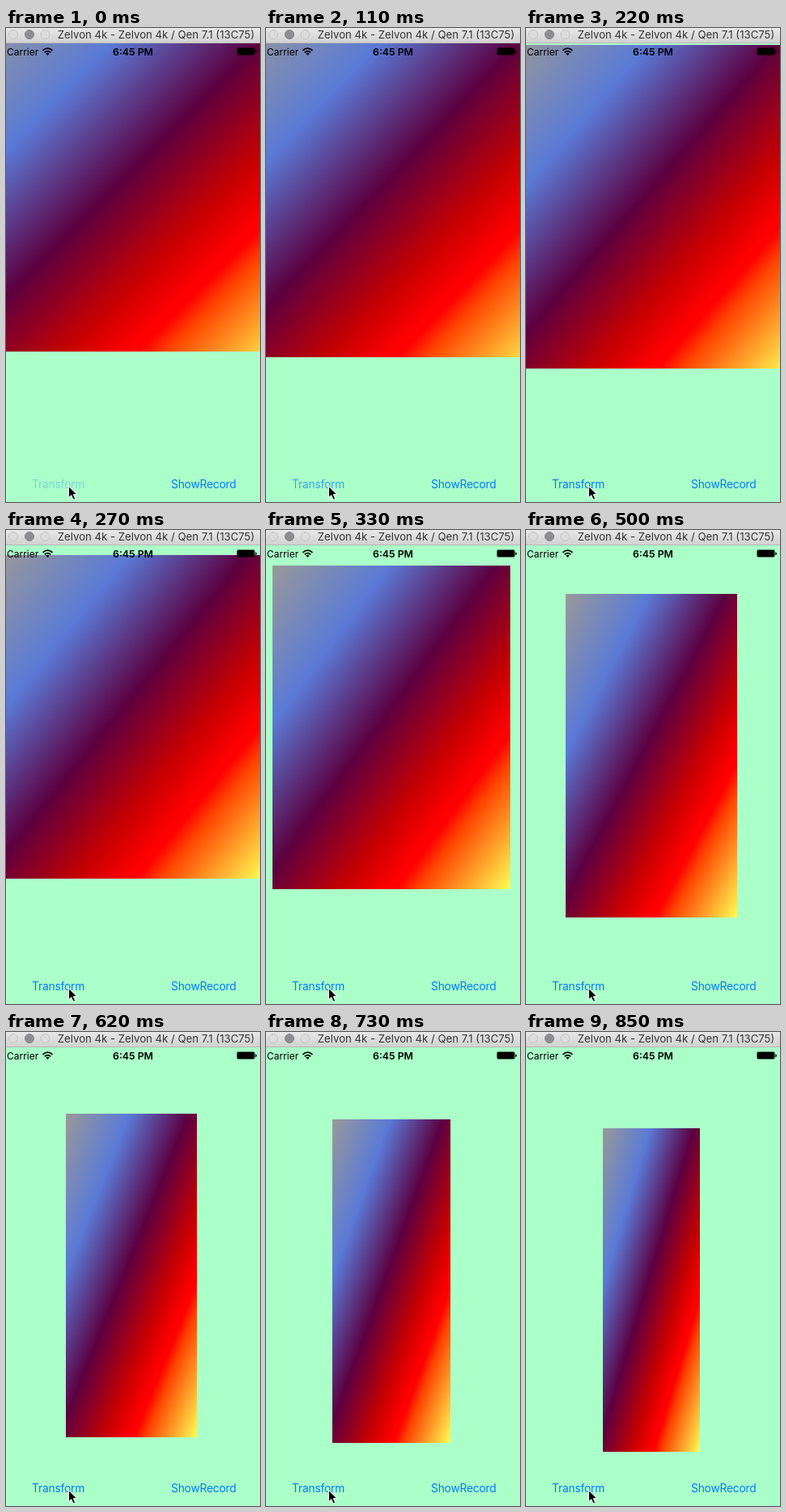
An HTML page for the animation above (1000 ms loop, 314 by 586 pixels).

```html
<!DOCTYPE html>
<html lang="en">
<head>
<meta charset="utf-8">
<style>
  html, body { margin: 0; width: 100%; height: 100%; overflow: hidden; }
  body { position: relative; background: #abffc8; }
  #panel {
    position: absolute;
    height: 400px;
    background: linear-gradient(to bottom right,
      #999 0%, #5a7ad6 24.5%, #5c0040 47%, #c80000 65%, #f00 74.5%,
      #f00 76%, #ff4400 80.5%, #ffff55 100%);
  }
  svg { position: absolute; left: 0; top: 0; }
  text { font-family: Inter, Roboto, sans-serif; }
  .button { font-size: 13.8px; letter-spacing: -.2px; fill: #007aff; }
</style>
</head>
<body>
<div id="panel"></div>
<svg width="314" height="586" viewBox="0 0 314 586">
  <defs>
    <linearGradient id="chrome" x2="0" y2="1">
      <stop stop-color="#e8e8e8"/>
      <stop offset="1" stop-color="#d0d0d0"/>
    </linearGradient>
  </defs>

  <!-- window title bar -->
  <rect width="314" height="19" fill="url(#chrome)"/>
  <rect y="18" width="314" height="1" fill="#b8b8b8"/>
  <g fill="#dcdcdc" stroke="#c4c4c4">
    <circle cx="9" cy="8" r="5.5"/>
    <circle cx="29" cy="8" r="5.5" fill="#8e8e92" stroke="#848488"/>
    <circle cx="48.5" cy="8" r="5.5"/>
  </g>
  <text x="185.5" y="13" font-size="13.2" text-anchor="middle" fill="#333">Zelvon 4k - Zelvon 4k / Qen 7.1 (13C75)</text>

  <!-- status bar -->
  <text x="1" y="34" font-size="12">Carrier</text>
  <g fill="none" stroke="#000" stroke-width="1.8">
    <path d="M45.5 27.8Q51.5 22.4 57.5 27.8M47.8 30.2Q51.5 27 55.2 30.2"/>
    <path d="M49.3 31.6Q51.5 29.8 53.7 31.6L51.5 34z" fill="#000" stroke="none"/>
  </g>
  <text x="157" y="34" font-size="12.3" font-weight="600" text-anchor="middle">6:45 PM</text>
  <rect x="285.5" y="24.5" width="22" height="9" rx="1.8" fill="none" stroke="#000" stroke-opacity=".5"/>
  <rect x="286" y="25" width="21" height="8" rx="1"/>
  <path d="M308.3 27.3q1.7 .4 1.7 2t-1.7 2z"/>

  <text id="transform" class="button" x="32" y="569">Transform</text>
  <text class="button" x="204" y="569">ShowRecord</text>
  <path d="M77.5 566.5v14.2l3.2-3 2.4 5.4 2.6-1.1-2.4-5.3h4.5z" stroke="#fff"/>
</svg>
<script>
  const panel = document.getElementById('panel');
  const label = document.getElementById('transform');

  // The screen updates in steps: start time in ms, then the phase of the move.
  const steps = [
    [0, .065], [50, .12], [110, .18], [170, .24], [220, .299], [270, .36],
    [330, .427], [390, .492], [440, .548], [500, .6], [560, .671], [620, .728],
    [680, .79], [740, .855], [790, .92], [850, 1]
  ];

  // Ease-in-out: cubic-bezier(.42, 0, .58, 1), solved by bisection.
  function ease(x) {
    let lo = 0, hi = 1, s = .5;
    for (let i = 0; i < 24; i++) {
      const bx = 1.26 * s * (1 - s) ** 2 + 1.74 * s * s * (1 - s) + s ** 3;
      if (bx < x) lo = s; else hi = s;
      s = (lo + hi) / 2;
    }
    return s * s * (3 - 2 * s);
  }

  function draw() {
    const now = performance.now() % 1000;
    const [time, phase] = steps.findLast(step => step[0] <= now);
    const p = ease(phase);
    const width = 400 - 280 * p;
    panel.style.left = 155 - width / 2 + 'px';
    panel.style.top = -1 + 120 * p + 'px';
    panel.style.width = width + 'px';
    label.style.opacity = Math.min(1, .3 + .7 * time / 200);
    requestAnimationFrame(draw);
  }
  draw();
</script>
</body>
</html>
```
